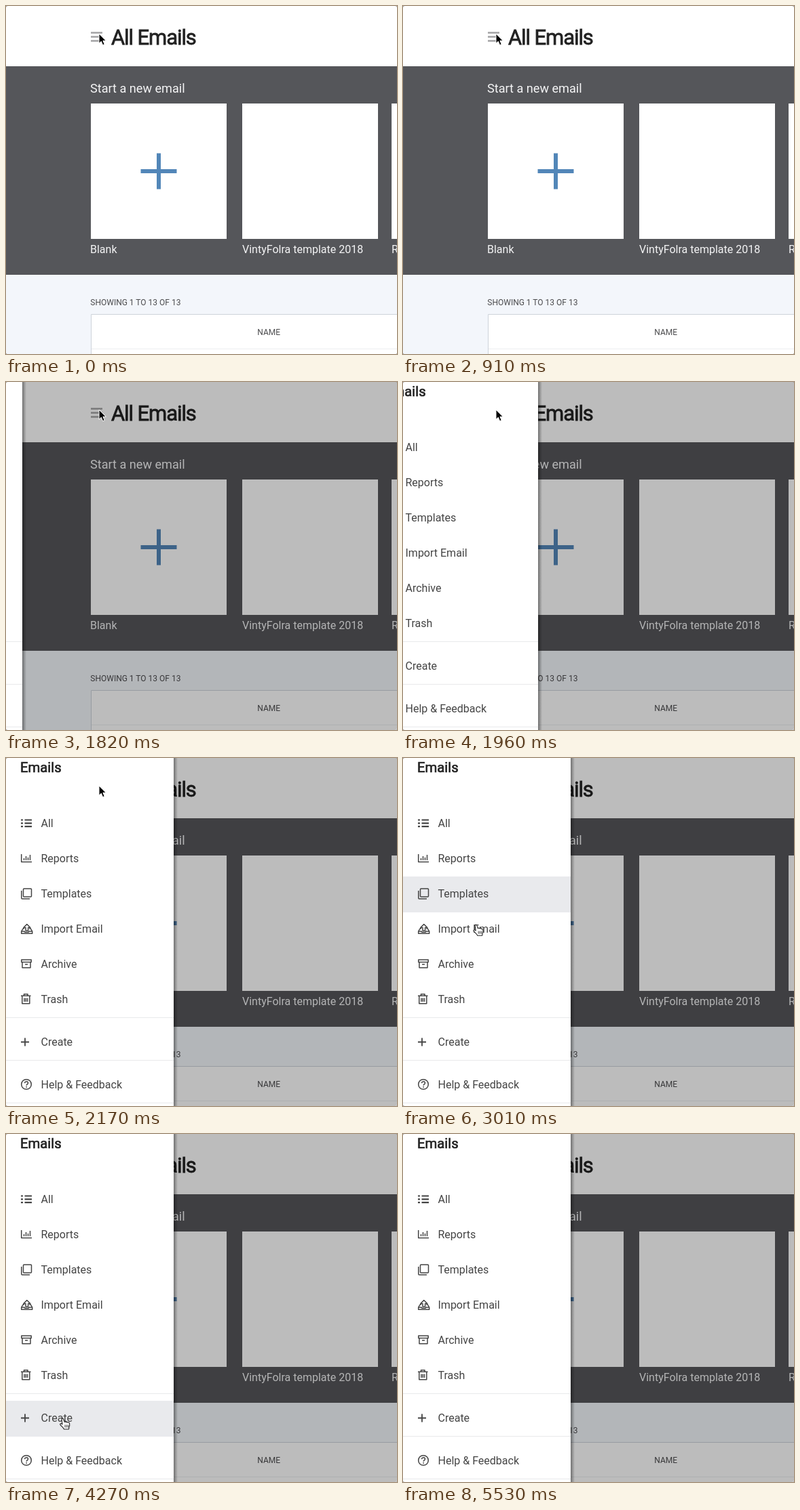
An HTML page for the animation above (5670 ms loop, 576 by 514 pixels).

```html
<!DOCTYPE html>
<html lang="en">
<head>
<meta charset="utf-8">
<title>All Emails</title>
<style>
  html, body { margin: 0; width: 100%; height: 100%; overflow: hidden; background: #999; }
  svg { display: block; width: 576px; height: 514px; border-radius: 3px; font-family: Roboto, sans-serif; }
  .title { fill: #222; stroke: #222; stroke-width: .8px; }
  .light { fill: #f4f4f5; font-size: 16px; }
  .small { fill: #4c4c4e; font-size: 12px; }
  .menu { fill: #444; font-size: 16px; }
  .icon { fill: none; stroke: #444; stroke-width: 1.5px; stroke-linejoin: round; }
</style>
</head>
<body>
<svg viewBox="0 0 576 514">
  <defs>
    <linearGradient id="shade">
      <stop offset="0" stop-opacity=".4"/>
      <stop offset="1" stop-opacity="0"/>
    </linearGradient>
  </defs>

  <g id="page">
    <rect width="576" height="514" fill="#fff"/>
    <path d="M125 39.5h17M125 45.5h17M125 51.5h17" stroke="#a2a2a4" stroke-width="2.4"/>
    <text class="title" x="155" y="57" font-size="31" letter-spacing="-1.1">All Emails</text>
    <rect y="89" width="576" height="308" fill="#55565a"/>
    <text class="light" x="124" y="128" style="font-size:18.1px">Start a new email</text>
    <path d="M125 144h200v200h-200zM348 144h200v200h-200zM568 144h8v200h-8z" fill="#fff"/>
    <path d="M198.500 244h53M225 217.500v53" stroke="#5286b8" stroke-width="6"/>
    <text class="light" x="124" y="365">Blank</text>
    <text class="light" x="348" y="365">VintyFolra template 2018</text>
    <text class="light" x="568" y="365">R</text>
    <rect y="397" width="576" height="117" fill="#f3f6fb"/>
    <text class="small" x="124.300" y="442">SHOWING 1 TO 13 OF 13</text>
    <path d="M125.500 520V455.500H580V520z" fill="#fff" stroke="#cdd3da"/>
    <path d="M126 506.500h450" stroke="#eceef0"/>
    <text class="small" x="370.300" y="486">NAME</text>
  </g>

  <rect id="dim" width="576" height="514" opacity=".263"/>

  <g id="drawer">
    <rect x="247" width="6" height="514" fill="url(#shade)"/>
    <rect width="247" height="514" fill="#fff"/>
    <path d="M0 383.500h247M0 446.500h247M0 509.500h247" stroke="#e8e9eb"/>
    <rect id="hover" width="247" height="53" fill="#e9eaed"/>
    <text class="title" x="21" y="21" font-size="20.300" style="stroke-width:.65px">Emails</text>
    <g id="labels" class="menu"></g>
    <g class="icon">
      <path d="M22 91.500h3m2.500 0H38M22 96.300h3m2.500 0H38M22 101.200h3m2.500 0H38" stroke-width="2.200"/>
      <path d="M22.700 142v11.500H38M26.500 151v-3M29.500 151v-6M32.500 151v-4M35.500 151v-8"/>
      <path d="M26.500 193h10a1 1 0 0 1 1 1v10a1 1 0 0 1-1 1h-10a1 1 0 0 1-1-1v-10a1 1 0 0 1 1-1zM22.800 196v11a1 1 0 0 0 1 1H35"/>
      <path d="M27 252h-2l-2.300 4v3.200h16V256l-2.300-4h-2M22.700 256h4.300l1 1.300h5l1-1.300h4.700M29 255v-4.500h-3.200l5-5 5 5h-3.200v4.500z"/>
      <path d="M22.800 298h14.400v3.500H22.800zM24 301.500v8.300h12v-8.300M28 304.800h4"/>
      <path d="M22 351.300h14.500M26.500 351v-2.300h5.500V351M23.800 351.500v11.300h11v-11.300M27 354.500v5.500M29.300 354.500v5.500M31.600 354.500v5.500"/>
      <path d="M22 419.500h12M28 413.500v12" stroke-width="1.800"/>
      <circle cx="30" cy="482" r="7.300"/>
      <path d="M27.600 480.300c0-3.200 4.900-3.200 4.900-.2 0 1.700-2.400 1.700-2.400 3.600M30.100 485v1.700"/>
    </g>
  </g>

  <g id="cursor">
    <path id="arrow" d="M0 0v14.300l3.300-3.100 2.300 5.500 2.600-1.100-2.300-5.300h4.400z" fill="#000" stroke="#fff" stroke-width="1"/>
    <g id="hand" stroke="#222" stroke-width="1.100" stroke-linejoin="round">
      <path fill="#fff" d="M-2 2c-.5-2 2-2.600 2.600-.8L2.200 5.500c.6-1 2.200-.8 2.600.3.7-.8 2.100-.5 2.400.5 1-.6 2.300 0 2.400 1.200.3 2.200.2 4-.7 5.600L8.500 16h-7C.5 13.500-2.500 11.500-4 9.600c-.8-1.200.6-2.600 2-1.600l1 .8z"/>
      <path fill="none" d="M3 9.500v4M5.200 9.500v4M7.400 9.500v4" stroke-width=".9"/>
    </g>
  </g>
</svg>
<script>
const LOOP = 5670, STEP = 70, OPEN = 1820, LEAVE = 5530;
const SLIDE_START = 1750, SLIDE_TIME = 400, WIDTH = 247;
const $ = id => document.getElementById(id);

// Menu rows: label, top of the row
const rows = [
  ["All", 71], ["Reports", 123], ["Templates", 175], ["Import Email", 227],
  ["Archive", 279], ["Trash", 331], ["Create", 394], ["Help & Feedback", 457]
];
for (const [label, top] of rows) {
  const text = document.createElementNS("http://www.w3.org/2000/svg", "text");
  text.setAttribute("x", 51.5);
  text.setAttribute("y", top + 31);
  text.textContent = label;
  $("labels").append(text);
}

const linear = p => p;
const easeOut = p => 1 - (1 - p) ** 2;

// Pointer stops: time, x, y, easing of the way there
const stops = [
  [0, 137, 41, linear],
  [2590, 137, 41, linear],
  [3290, 89, 383, linear],
  [3640, 84, 420, easeOut],
  [5390, 84, 420, linear],
  [5460, 83, 446, linear]
];

function pointerAt(t) {
  const i = stops.findIndex(s => s[0] > t);
  if (i < 0) return stops[stops.length - 1].slice(1, 3);
  if (i === 0) return stops[0].slice(1, 3);
  const [t0, x0, y0] = stops[i - 1], [t1, x1, y1, ease] = stops[i];
  const p = ease((t - t0) / (t1 - t0));
  return [x0 + (x1 - x0) * p, y0 + (y1 - y0) * p];
}

// cubic-bezier(.4, 0, .2, 1), solved by bisection
function standardEase(x) {
  let lo = 0, hi = 1;
  for (let i = 0; i < 20; i++) {
    const s = (lo + hi) / 2, r = 1 - s;
    if (1.2 * r * r * s + .6 * r * s * s + s ** 3 < x) lo = s; else hi = s;
  }
  return lo * lo * (3 - 2 * lo);
}

const show = (id, on) => $(id).style.display = on ? "" : "none";
const move = (id, x, y) => $(id).setAttribute("transform", `translate(${x} ${y})`);

function draw(t) {
  const open = t >= OPEN;
  show("dim", open);
  show("drawer", open);
  const p = Math.min(1, Math.max(0, (t - SLIDE_START) / SLIDE_TIME));
  move("drawer", Math.round(WIDTH * (standardEase(p) - 1)), 0);

  // The hover state trails the pointer by one step
  const [, lagY] = pointerAt(t - STEP);
  const row = open && t < LEAVE && rows.find(([, top]) => lagY >= top && lagY <= top + 52);
  show("hover", row);
  if (row) move("hover", 0, row[1]);

  show("cursor", t < LEAVE);
  show("hand", row);
  show("arrow", !row);
  move("cursor", ...pointerAt(t));
}

const start = performance.now();
function tick() {
  const t = (performance.now() - start) % LOOP;
  draw(Math.floor(t / STEP) * STEP);
  requestAnimationFrame(tick);
}
tick();
</script>
</body>
</html>
```
